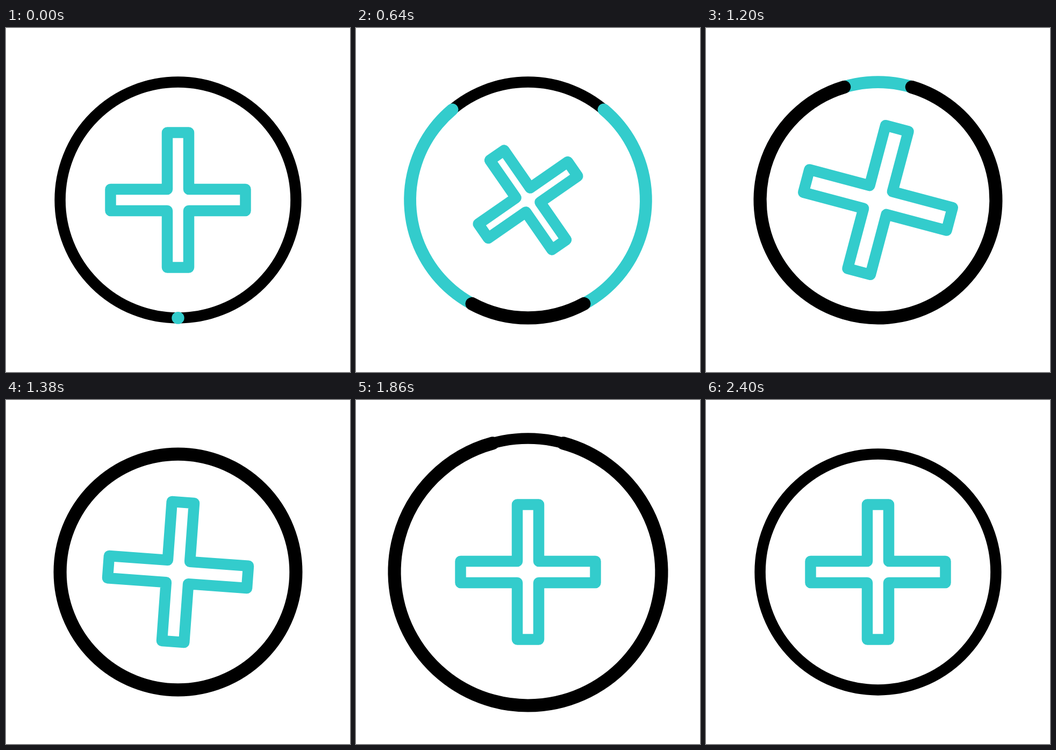
Recreate the animation shown at these times as an HTML page with a canvas. Size 640 by 640 pixels, loop 2420 ms.

```html
<!DOCTYPE html>
<html lang="en">
<head>
<meta charset="utf-8">
<title>Plus</title>
<style>
  html, body { margin: 0; width: 100%; height: 100%; overflow: hidden; background: #fff; }
  canvas { display: block; width: 640px; height: 640px; }
</style>
</head>
<body>
<canvas id="stage" width="640" height="640"></canvas>
<script>
const LOOP = 2420;
const TEAL = '#33cccc', BLACK = '#000';
const RADIUS = 219.4, ARM = 125.5, HALF = 20;
const ctx = document.getElementById('stage').getContext('2d');

const smooth = s => s * s * (3 - 2 * s);
const soft = s => s + 0.65 * (smooth(s) - s);

// Each track is a list of [time, value] keys.
const tracks = {
  spin: [[110, 0], [1143, 106], [1500, 90]],
  size: [[268, 1], [808, 0.75], [1170, 1.1], [1520, 1]],
  ring: [[1380, RADIUS], [1765, 252], [2235, RADIUS]],
  teal: [[0, 0], [890, 180]],
  cover: [[445, 0], [1335, 180]],
  uncover: [[1750, 180], [2370, 0]]
};

function at(keys, t, ease = smooth) {
  if (t <= keys[0][0]) return keys[0][1];
  for (let i = 1; i < keys.length; i++) {
    const [t0, a] = keys[i - 1], [t1, b] = keys[i];
    if (t < t1) return a + (b - a) * ease((t - t0) / (t1 - t0));
  }
  return keys[keys.length - 1][1];
}

// Arc that spreads to both sides from the bottom of the ring.
function arc(radius, degrees, width, color) {
  if (degrees <= 0) return;
  const half = degrees * Math.PI / 180;
  ctx.beginPath();
  ctx.arc(0, 0, radius, Math.PI / 2 - half, Math.PI / 2 + half);
  ctx.lineWidth = width;
  ctx.strokeStyle = color;
  ctx.stroke();
}

function plus(size, degrees) {
  const a = ARM * size, h = HALF * size;
  ctx.save();
  ctx.rotate(degrees * Math.PI / 180);
  ctx.beginPath();
  for (let i = 0; i < 4; i++) {
    const c = [1, 0, -1, 0][i], s = [0, 1, 0, -1][i];
    for (const [x, y] of [[-h, -h], [-h, -a], [h, -a]]) {
      ctx.lineTo(x * c - y * s, x * s + y * c);
    }
  }
  ctx.closePath();
  ctx.lineWidth = 20.5;
  ctx.strokeStyle = TEAL;
  ctx.stroke();
  ctx.restore();
}

function draw(t) {
  const r = at(tracks.ring, t);
  ctx.setTransform(1, 0, 0, 1, 0, 0);
  ctx.fillStyle = '#fff';
  ctx.fillRect(0, 0, 640, 640);
  ctx.translate(320, 320);
  ctx.lineCap = ctx.lineJoin = 'round';

  arc(r, 180, 20.5, BLACK);
  if (t < 1340) arc(r, at(tracks.teal, t, soft), 22.8, TEAL);
  arc(r, t < 1700 ? at(tracks.cover, t, soft) : at(tracks.uncover, t), 24.2, BLACK);
  plus(at(tracks.size, t), at(tracks.spin, t));
}

const start = performance.now();
function tick() {
  draw((performance.now() - start) % LOOP);
  requestAnimationFrame(tick);
}
tick();
</script>
</body>
</html>
```
